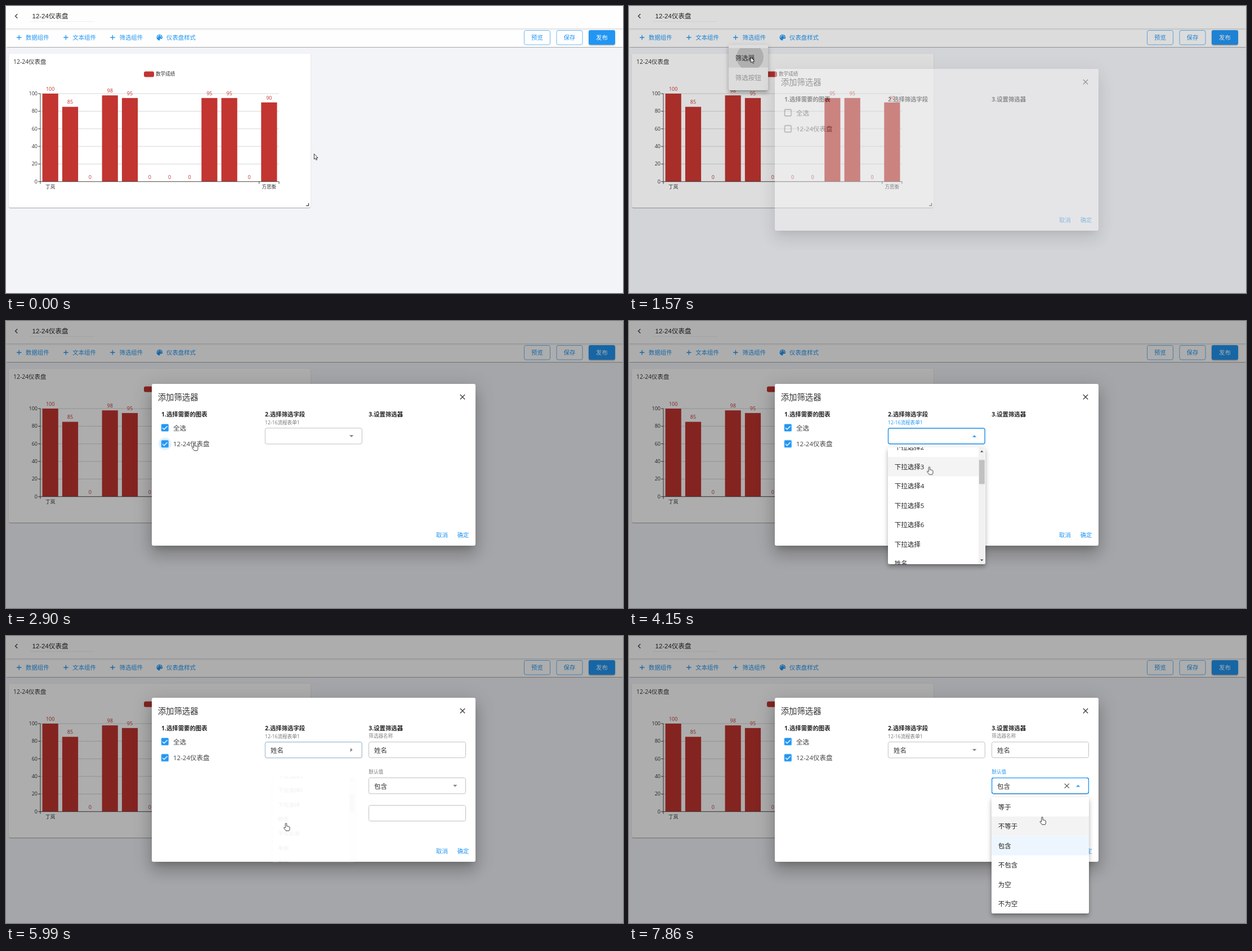
Animation, 1096 px wide and 511 px high, one loop 8 s. Source, as an HTML page:

```html
<!DOCTYPE html>
<html lang="zh-CN">
<head>
<meta charset="utf-8">
<title>仪表盘</title>
<style>
html, body { margin: 0; width: 100%; height: 100%; overflow: hidden; background: #f3f4f8; }
body { position: relative; }
div, svg { position: absolute; }
svg { left: 0; top: 0; width: 1096px; height: 511px; overflow: visible; }
text { font: 10.4px "Open Sans", "Noto Sans CJK SC", sans-serif; dominant-baseline: central; fill: #333; }
.s { font-size: 8.6px; }
.n { font-size: 9px; }
.l { font-size: 11.5px; }
.h { font-weight: 700; fill: #222; }
.mid { text-anchor: middle; }
.end { text-anchor: end; }
.gray { fill: #858585; }
.blue { fill: #2196f3; }
.box { fill: none; stroke: #c0c0c0; }
.ring { fill: none; stroke: #2196f3; stroke-width: 1.4; }
.line { fill: none; stroke: #444; stroke-width: 1.4; }

.header { width: 1096px; height: 40px; background: #fefefe; box-shadow: 0 1px 3px rgba(0,0,0,.16); z-index: 1; }
.bar { top: 41px; width: 1096px; height: 32px; background: #fefefe; }
.card { left: 5px; top: 85px; width: 535.5px; height: 273.5px; border-radius: 3px; background: #fff; }
.bar, .card { box-shadow: 0 1.4px .7px -.7px rgba(0,0,0,.2), 0 .7px .7px rgba(0,0,0,.14), 0 .7px 2.2px rgba(0,0,0,.12); }
.page { z-index: 2; }
.publish { left: 1035px; top: 43px; width: 47px; height: 26px; border-radius: 3px; background: #2196f3; box-shadow: 0 2px 1.4px -1.4px rgba(0,0,0,.2), 0 1.4px 1.4px rgba(0,0,0,.14), 0 .7px 3.6px rgba(0,0,0,.12); z-index: 2; }

.menu { background: #fff; border-radius: 3px; overflow: hidden; z-index: 3;
  box-shadow: 0 3.6px 3.6px -2.2px rgba(0,0,0,.2), 0 5.8px 7.2px .7px rgba(0,0,0,.14), 0 2.2px 10px 1.4px rgba(0,0,0,.12); }
.filter { left: 177px; top: 69px; width: 70px; height: 81px; }
.fields { left: 460px; top: 225px; width: 172.5px; height: 208px; z-index: 6; }
.ops { left: 644px; top: 287px; width: 172.7px; height: 207px; z-index: 6; }
.shade { inset: 0; background: rgba(0,0,0,.32); z-index: 4; }
.modal { inset: 0; z-index: 5; }
.panel { left: 258.5px; top: 112px; width: 575.5px; height: 288px; border-radius: 3px; background: #fff;
  box-shadow: 0 8px 11px -5px rgba(0,0,0,.2), 0 17px 27px 2px rgba(0,0,0,.14), 0 6.5px 33px 6px rgba(0,0,0,.12); }
.mouse { z-index: 9; }

/* one 8 s clock for everything: percent = ms / 80 */
.cut, .flow { animation-duration: 8s; animation-iteration-count: infinite; }
.cut { animation-timing-function: step-end; }
.flow { animation-timing-function: cubic-bezier(.4,0,.2,1); }

@keyframes path {
  0%, 1% { transform: translate(547px,263px); }
  8.2%, 9.5% { transform: translate(219px,60px); }
  11.7% { transform: translate(218px,74px); }
  15.6%, 24.6% { transform: translate(216px,91px); }
  31.4%, 34.2% { transform: translate(290px,214px); }
  36.25% { transform: translate(334.5px,217px); }
  43.1%, 46.9% { transform: translate(561px,212px); }
  49.4%, 59.4% { transform: translate(533.5px,259.5px); }
  64.1%, 65.1% { transform: translate(509px,353px); }
  67.1%, 75.1% { transform: translate(497.5px,333px); }
  80.75%, 81.75% { transform: translate(738px,313px); }
  86.6%, 90.6% { transform: translate(752px,268px); }
  98.2%, 100% { transform: translate(734px,322px); }
}
@keyframes arrow { 0%, 18.1%, 38%, 75.6% { opacity: 1; } 7.3%, 28.5%, 41%, 83.8% { opacity: 0; } }
@keyframes hand { 0%, 18.1%, 38%, 75.6% { opacity: 0; } 7.3%, 28.5%, 47.8%, 94% { opacity: 1; } }
@keyframes beam { 0%, 47.8%, 94% { opacity: 0; } 41%, 83.8% { opacity: 1; } }

@keyframes hoverBtn { 0%, 13% { opacity: 0; } 7.3% { opacity: 1; } }
@keyframes filterMenu {
  0%, 9.5% { opacity: 0; transform: scale(.75,.5625); }
  11.6%, 19.8% { opacity: 1; transform: none; }
  21.9%, 100% { opacity: 0; transform: none; }
}
@keyframes ripple {
  0%, 17.75% { opacity: 1; transform: scale(.1); animation-timing-function: ease-out; }
  19.6% { opacity: 1; transform: scale(1); }
  21.6%, 100% { opacity: 0; transform: scale(1.4); }
}
@keyframes fade { 0%, 18.75% { opacity: 0; } 21.56%, 100% { opacity: 1; } }
@keyframes picked { 0% { opacity: 0; } 33.25%, 100% { opacity: 1; } }
@keyframes blank { 0% { opacity: 1; } 33.25%, 100% { opacity: 0; } }
@keyframes halo { 0%, 37.5% { opacity: 0; } 30% { opacity: 1; } }
@keyframes chosen { 0% { opacity: 0; } 72.9%, 100% { opacity: 1; } }
@keyframes grow { 0% { top: 112px; height: 288px; } 72.9%, 100% { top: 110px; height: 292px; } }
@keyframes up { 0% { transform: none; } 72.9%, 100% { transform: translateY(-2px); } }
@keyframes down { 0% { transform: none; } 72.9%, 100% { transform: translateY(2px); } }

@keyframes ringA { 0%, 43.8% { opacity: 0; } 43.9%, 72.9% { opacity: 1; } 74.9% { opacity: .2; } 75.75%, 100% { opacity: 0; } }
@keyframes tintA { 0%, 72.9%, 100% { fill: #777; } 43.9% { fill: #2196f3; } }
@keyframes spinA { 0%, 43.9% { transform: none; } 46.5%, 72.9% { transform: rotate(-180deg); } 74.88% { transform: rotate(-80deg); } 76%, 100% { transform: rotate(0); } }
@keyframes fieldMenu {
  0%, 43.9% { opacity: 0; transform: scale(.75,.5625); }
  46.5%, 72.9% { opacity: 1; transform: none; animation-timing-function: linear; }
  74.88% { opacity: .08; transform: translateY(-2px) scale(.845,.743); animation-timing-function: linear; }
  75.8%, 100% { opacity: 0; transform: translateY(-2px) scale(.75,.5625); }
}
@keyframes scroll {
  0%, 50% { transform: none; }
  51.6%, 54.7% { transform: translateY(-52px); }
  56.4%, 57.5% { transform: translateY(-104px); }
  59.4%, 100% { transform: translateY(-156.5px); }
}
@keyframes thumb {
  0%, 50% { transform: none; }
  51.6%, 54.7% { transform: translateY(9.5px); }
  56.4%, 57.5% { transform: translateY(19px); }
  59.4%, 100% { transform: translateY(28.5px); }
}
@keyframes rowA {
  0% { transform: translateY(-60px); }
  48.2% { transform: translateY(34.5px); }
  50.8% { transform: translateY(69px); }
  55.4% { transform: translateY(138px); }
  58.4% { transform: translateY(190px); }
  59.4% { transform: translateY(207px); }
  61.2% { transform: translateY(241.5px); }
  62.6%, 100% { transform: translateY(276px); }
  66% { transform: translateY(241.5px); }
  80% { transform: translateY(241.5px); }
}

@keyframes hoverB { 0% { opacity: 0; } 83.8%, 100% { opacity: 1; } }
@keyframes focusB { 0% { opacity: 0; } 89.5%, 100% { opacity: 1; } }
@keyframes tintB { 0% { fill: #777; } 89.5%, 100% { fill: #2196f3; } }
@keyframes spinB { 0%, 89.5% { transform: none; } 92%, 100% { transform: rotate(-180deg); } }
@keyframes opMenu { 0%, 89.6% { opacity: 0; transform: scale(.75,.5625); } 92.4%, 100% { opacity: 1; transform: none; } }
@keyframes rowB { 0% { transform: translateY(-60px); } 94% { transform: none; } 97.6%, 100% { transform: translateY(34.5px); } }
</style>
</head>
<body>
<div class="header"></div>
<div class="bar"></div>
<div class="card"></div>
<div class="publish"></div>

<svg class="page" viewBox="0 0 1096 511">
  <path class="line" d="M20.3 14.2 16.5 18l3.8 3.8"/>
  <text x="46.5" y="17.5" class="l" style="font-family:'Liberation Sans','Noto Sans CJK SC',sans-serif;fill:#222">12-24仪表盘</text>
  <path d="M43 27.5H157" stroke="#ddd" stroke-width=".8" stroke-dasharray="1.4 1"/>

  <rect class="cut" style="animation-name:hoverBtn" x="178" y="43" width="71" height="26" rx="3" fill="#e7f3fe"/>
  <path d="M19 56h8.4m-4.2-4.2v8.4M102.2 56h8.4m-4.2-4.2v8.4M185.2 56h8.4m-4.2-4.2v8.4" stroke="#2196f3" stroke-width="1.3"/>
  <circle cx="272.8" cy="56" r="5.3" class="blue"/>
  <g fill="#fff">
    <circle cx="269.5" cy="55.2" r=".9"/><circle cx="271.2" cy="52.9" r=".9"/>
    <circle cx="274.2" cy="52.9" r=".9"/><circle cx="276" cy="55.2" r=".9"/>
    <path d="M273.4 62v-1.6q-.6-2 1-2.1h2.2l2.4 0v3.7z"/>
  </g>
  <text x="35" y="56" class="blue">数据组件</text>
  <text x="118.3" y="56" class="blue">文本组件</text>
  <text x="201.6" y="56" class="blue">筛选组件</text>
  <text x="285" y="56" class="blue">仪表盘样式</text>
  <rect x="920.5" y="43.5" width="46" height="25.5" rx="3" fill="none" stroke="#6ab8f7"/>
  <rect x="978" y="43.5" width="46" height="25.5" rx="3" fill="none" stroke="#6ab8f7"/>
  <text x="943.5" y="56" class="blue mid">预览</text>
  <text x="1001" y="56" class="blue mid">保存</text>
  <text x="1058.5" y="56" class="mid" style="fill:#fff">发布</text>

  <text x="13" y="99">12-24仪表盘</text>
  <path d="M537.5 351v4.5H533" fill="none" stroke="#555" stroke-width="1.5"/>
  <rect x="245" y="116.5" width="18" height="10" rx="3" fill="#c23531"/>
  <text x="266" y="121" class="s">数学成绩</text>
  <g id="chart"></g>
</svg>

<div class="menu filter flow" style="animation-name:filterMenu">
  <svg viewBox="0 0 1096 511">
    <clipPath id="item"><rect y="6" width="70" height="34.5"/></clipPath>
    <rect y="6" width="70" height="34.5" fill="#ebebeb"/>
    <g clip-path="url(#item)"><g transform="translate(38 22)">
      <circle class="flow" style="animation-name:ripple" r="24" fill="rgba(0,0,0,.14)"/>
    </g></g>
    <text x="11.7" y="23.5" class="l">筛选器</text>
    <text x="11.7" y="58" class="l" style="fill:#aaa">筛选按钮</text>
  </svg>
</div>

<div class="shade flow" style="animation-name:fade"></div>

<div class="modal flow" style="animation-name:fade">
  <div class="panel cut" style="animation-name:grow"></div>
  <svg viewBox="0 0 1096 511">
    <g class="cut" style="animation-name:up">
      <text x="269.7" y="135" style="font-size:14.4px">添加筛选器</text>
      <path class="line" d="M806.8 131l8.4 8.4m0-8.4-8.4 8.4"/>
      <text x="276" y="165.5" class="h">1.选择需要的图表</text>
      <text x="460" y="165.5" class="h">2.选择筛选字段</text>
      <text x="644.3" y="165.5" class="h">3.设置筛选器</text>
      <circle class="cut" style="animation-name:halo" cx="282.3" cy="218.7" r="11.5" fill="rgba(33,150,243,.12)"/>
      <g id="checks"></g>
      <text x="297" y="190" class="l" style="fill:#444">全选</text>
      <text x="297" y="218.7" class="l" style="fill:#444">12-24仪表盘</text>

      <g class="cut" style="animation-name:picked">
        <text x="460" y="180.5" class="s cut" style="animation-name:tintA">12-16流程表单1</text>
        <rect class="box" x="460.3" y="190.7" width="172" height="28.3" rx="3"/>
        <rect class="ring flow" style="animation-name:ringA" x="460.5" y="191" width="171.6" height="27.8" rx="3"/>
        <g transform="translate(613.6 205)"><g class="flow" style="animation-name:spinA">
          <path class="cut" style="animation-name:tintA" d="M-3.6-1.8h7.2L0 1.8z"/>
        </g></g>
        <text x="470" y="205" class="l cut" style="animation-name:chosen">姓名</text>
      </g>
    </g>

    <g class="cut" style="animation-name:chosen">
      <text x="644.3" y="178" class="s gray">筛选器名称</text>
      <rect class="box" x="644.5" y="188.7" width="172" height="28" rx="3"/>
      <text x="654" y="203" class="l">姓名</text>
      <text x="644.3" y="242" class="s cut" style="animation-name:tintB">默认值</text>
      <rect class="box" x="644.5" y="252.5" width="172" height="28.3" rx="3"/>
      <g class="cut" style="animation-name:hoverB">
        <rect class="box" style="stroke:#333" x="644.5" y="252.5" width="172" height="28.3" rx="3"/>
        <path class="line" style="stroke-width:1.1" d="M773.8 262.8l8 8m0-8-8 8"/>
      </g>
      <rect class="ring cut" style="animation-name:focusB" x="644.6" y="252.6" width="171.8" height="28" rx="3"/>
      <text x="654" y="267" class="l">包含</text>
      <g transform="translate(797.7 266.8)"><g class="flow" style="animation-name:spinB">
        <path class="cut" style="animation-name:tintB" d="M-3.6-1.8h7.2L0 1.8z"/>
      </g></g>
      <rect class="box" x="644.5" y="301.5" width="172" height="28" rx="3"/>
    </g>

    <g class="cut" style="animation-name:down">
      <text x="764" y="381" class="blue">取消</text>
      <text x="801.7" y="381" class="blue">确定</text>
    </g>
  </svg>
</div>

<div class="menu fields flow" style="animation-name:fieldMenu">
  <svg viewBox="0 0 1096 511">
    <g class="flow" style="animation-name:scroll">
      <rect class="cut" style="animation-name:rowA" width="161" height="34.5" fill="#f4f4f4"/>
      <g id="fieldRows"></g>
    </g>
    <rect x="161" width="11.5" height="208" fill="#f1f1f1"/>
    <rect class="flow" style="animation-name:thumb" x="161.8" y="12.8" width="10" height="43" fill="#c1c1c1"/>
    <path d="M164 8.4h5.4l-2.7-3zM164 199.6h5.4l-2.7 3z" fill="#444"/>
  </svg>
</div>

<div class="menu ops flow" style="animation-name:opMenu">
  <svg viewBox="0 0 1096 511">
    <rect y="69" width="173" height="34.5" fill="#edf6fe"/>
    <rect class="cut" style="animation-name:rowB" width="173" height="34.5" fill="#f3f3f3"/>
    <g id="opRows"></g>
  </svg>
</div>

<svg class="mouse" viewBox="0 0 1096 511">
  <g class="flow" style="animation-name:path;animation-timing-function:ease-in-out" fill="#fff" stroke="#222" stroke-width=".9" stroke-linejoin="round">
    <path class="cut" style="animation-name:arrow" d="M.3.3v9.6l2.2-2 1.6 3.4 1.5-.7-1.5-3.3h2.9z"/>
    <path class="cut" style="animation-name:hand" d="M-1.2 8.6V1.4a1.1 1.1 0 0 1 2.3 0v4l3.8.8q1.5.4 1.5 2v1.9q0 2.4-1.1 3.7H-.3q-1-1.7-3.3-4.2-.9-1.5.6-1.7.8 0 1.8.9z"/>
    <path class="cut" style="animation-name:beam" fill="none" d="M-2-5h4M0-5V5M-2 5h4"/>
  </g>
</svg>

<script>
const fill = (id, parts) => document.getElementById(id).innerHTML = parts.join('');
const label = (x, y, cls, text, color = '#333') =>
  `<text x="${x}" y="${y}" class="${cls}" style="fill:${color}">${text}</text>`;

// bar chart
const scores = [100, 85, 0, 98, 95, 0, 0, 0, 95, 95, 0, 90];
const left = 61, right = 485, base = 312.7, unit = 1.567, red = '#c23531';
const step = (right - left) / scores.length;
const center = i => left + step * (i + .5);
const chart = [];
for (let v = 0; v <= 100; v += 20) {
  const y = base - v * unit;
  if (v) chart.push(`<path d="M${left} ${y}H${right}" stroke="#ccc" stroke-width=".8"/>`);
  chart.push(`<path d="M${left - 4} ${y}h4" stroke="#333" stroke-width=".9"/>`, label(56, y - .6, 'n end', v));
}
scores.forEach((v, i) => {
  const h = v * unit;
  chart.push(`<rect x="${center(i) - 14.1}" y="${base - h}" width="28.2" height="${h}" fill="${red}"/>`,
    label(center(i), base - h - 8.6, 'n mid', v, red));
});
chart.push(`<path d="M${left} ${base - 100 * unit}V${base + 4}M${left} ${base}H${right}v4M${right - step} ${base}v4" fill="none" stroke="#333" stroke-width=".9"/>`,
  label(center(0), 322, 's mid', '丁岚'), label(center(11), 322, 's mid', '方思衡'));
fill('chart', chart);

// checkboxes
fill('checks', [190, 218.7].map(y => `<g transform="translate(282.3 ${y})">
  <rect class="cut" style="animation-name:blank" x="-5.7" y="-5.7" width="11.4" height="11.4" rx="1" fill="none" stroke="#666" stroke-width="1.4"/>
  <g class="cut" style="animation-name:picked">
    <rect x="-6.5" y="-6.5" width="13" height="13" rx="1.5" fill="#2196f3"/>
    <path d="M-4.2.2l2.8 2.8L4.3-2.8" fill="none" stroke="#fff" stroke-width="1.5"/>
  </g></g>`));

// option lists
const rows = names => names.map((name, i) => label(11.7, 17.2 + 34.5 * i, 'l', name, '#222'));
const picks = [1, 2, 3, 4, 5, 6, ''].map(n => '下拉选择' + n);
fill('fieldRows', rows([...picks, '姓名', '学生信息', '年龄', '性别']));
fill('opRows', rows(['等于', '不等于', '包含', '不包含', '为空', '不为空']));
</script>
</body>
</html>
```
